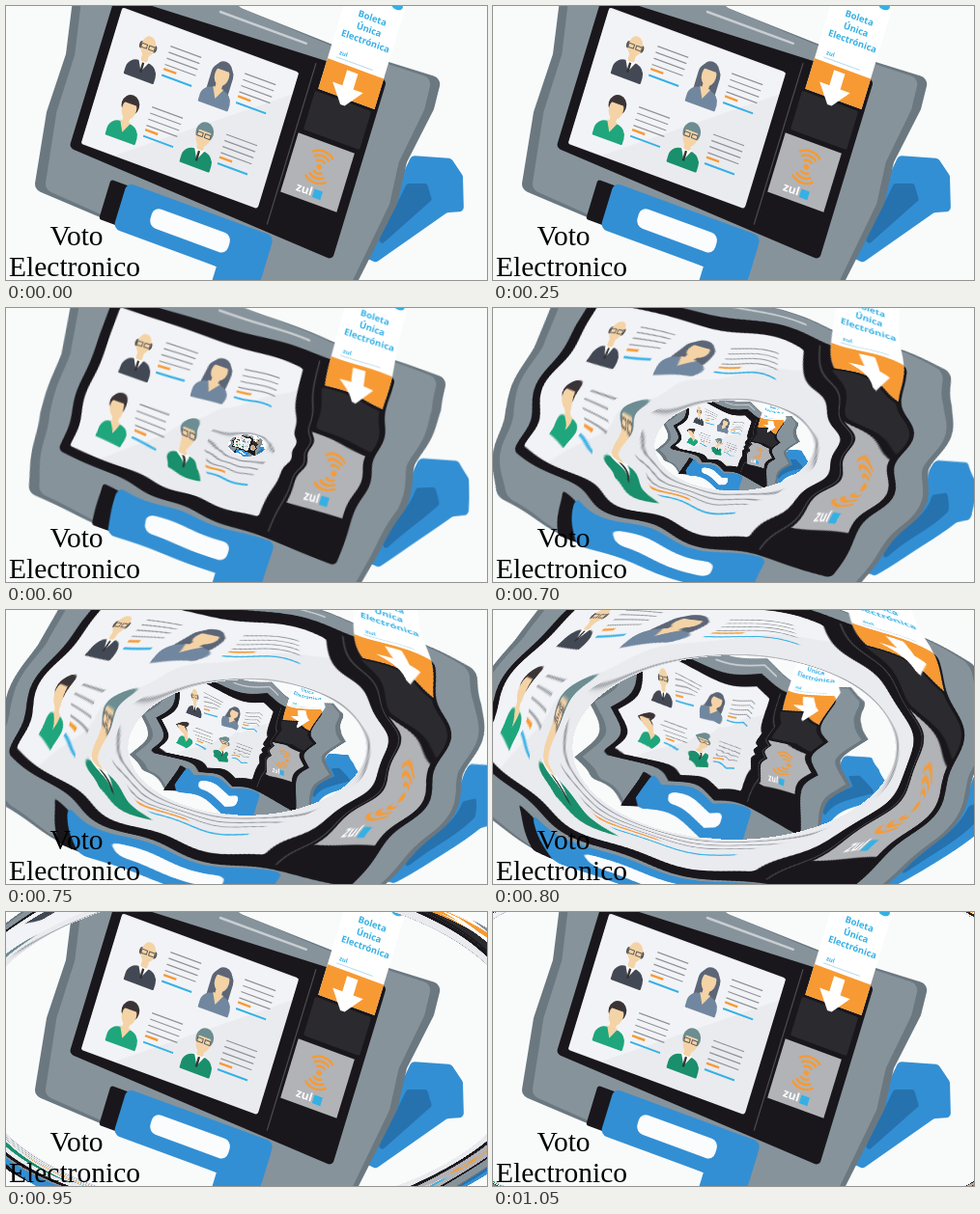
Recreate the animation shown at these times as an HTML page with a canvas. Size 498x284 px, loop 1100 ms.

```html
<!DOCTYPE html>
<html lang="es">
<head>
<meta charset="utf-8">
<title>Voto Electronico</title>
<style>
html, body { margin: 0; width: 100%; height: 100%; overflow: hidden; background: #f9fbfb; }
canvas { display: block; }
</style>
</head>
<body>
<canvas id="stage" width="498" height="284"></canvas>
<script>
const W = 498, H = 284, LOOP = 1100, STEP = 50, START = 600;
const LIGHT = '#87939b', DARK = '#6b7880', BLACK = '#19171b', WHITE = '#fbfcfd';
const BLUE = '#338fd3', DEEP = '#2672ae', CYAN = '#35b0e5', ORANGE = '#f79a33', SKIN = '#f4d3a6';

const stage = document.getElementById('stage').getContext('2d');
const scene = document.createElement('canvas');
scene.width = W;
scene.height = H;
const g = scene.getContext('2d', { willReadFrequently: true });

// Closed polygon with rounded corners
function poly(color, radius, ...points) {
  const mid = (a, b) => [(a[0] + b[0]) / 2, (a[1] + b[1]) / 2];
  g.beginPath();
  g.moveTo(...mid(points.at(-1), points[0]));
  points.forEach((p, i) =>
    g.arcTo(...p, ...mid(p, points[(i + 1) % points.length]), radius));
  g.closePath();
  g.fillStyle = color;
  g.fill();
}

function box(color, x, y, w, h, radius = 0) {
  g.fillStyle = color;
  g.beginPath();
  g.roundRect(x, y, w, h, radius);
  g.fill();
}

function oval(color, x, y, rx, ry, from = 0, to = 2 * Math.PI) {
  g.fillStyle = color;
  g.beginPath();
  g.ellipse(x, y, rx, ry, 0, from, to);
  g.fill();
}

function label(text, x, y, size, color) {
  g.font = `bold ${size}px "Open Sans", sans-serif`;
  g.fillStyle = color;
  g.textAlign = 'center';
  g.fillText(text, x, y);
}

function at(x, y, scale, draw) {
  g.save();
  g.translate(x, y);
  g.scale(scale, scale);
  draw();
  g.restore();
}

function person({ hair, coat, long, bald, tie, glasses }) {
  if (long) box(hair, -10, -10, 20, 31, [10, 10, 4, 4]);
  box(coat, -14, 13, 28, 16, [10, 10, 1, 1]);
  poly(tie ? '#fff' : SKIN, 0, [-5, 12], [5, 12], [0, 22]);
  if (tie) box('#333', -1, 14, 2, 9);
  box(SKIN, -3, 4, 6, 9, 1);
  if (bald) box(hair, -8, -4, 16, 7, 3);
  else oval(hair, 0, -3, 8, 9);
  oval(SKIN, 0, bald ? -1 : 1, 6.5, 9);
  if (!bald) oval(hair, 0, -4, 7.5, 6, Math.PI, 2 * Math.PI);
  if (glasses) {
    g.strokeStyle = '#56585b';
    g.lineWidth = 0.8;
    for (const x of [-6, 1]) g.strokeRect(x, -2, 5, 3.5);
  }
}

function record(x, y) {
  for (let i = 0; i < 4; i++) box('#8e9297', x, y + i * 6.6, 34, 1.2);
  box(ORANGE, x, y + 24, 14, 2.4);
  box(CYAN, x, y + 31, 33, 2);
}

const people = [
  { hair: '#55504d', coat: '#434954', bald: true, tie: true, glasses: true },
  { hair: '#5c6677', coat: '#71879f', long: true },
  { hair: '#3b3436', coat: '#1fa67c' },
  { hair: '#6c8d92', coat: '#198f6b', tie: true, glasses: true },
];

function drawScreen() {
  box('#eaebef', -97.5, -74, 195, 148, 3);
  poly('#f2f3f6', 0, [-97, -73], [97, -73], [97, -50], [-60, 73], [-97, 73]);
  people.forEach((look, i) => {
    const x = -60 + 82 * (i % 2), y = -44 + 66 * Math.floor(i / 2);
    at(x, y, 1.18, () => person(look));
    record(x + 22, y - 10);
  });
}

function drawTicket() {
  box('#fff', 121.5, -190, 62, 125);
  oval(CYAN, 175, -174, 6, 4);
  ['Boleta', 'Única', 'Electrónica'].forEach((word, i) =>
    label(word, 154, -150 + 12.5 * i, 9.5, CYAN));
  label('zul', 136, -106, 6, CYAN);
  box('#b9dcec', 130, -103, 40, 1);
  box(ORANGE, 121.5, -98, 62, 33);
  at(150.5, -78, 1.2, () => {
    box('#fff', -5, -13, 10, 16);
    poly('#fff', 0, [-14, 1], [14, 1], [2, 17], [-2, 17]);
  });
}

function drawCard() {
  box('#b1b3b7', 115, -15, 62, 64);
  at(146, 11, 1, () => {
    oval(ORANGE, 0, 0, 3, 2.5);
    g.strokeStyle = ORANGE;
    g.lineWidth = 2.4;
    for (const middle of [-Math.PI / 2, Math.PI / 2]) {
      for (let r = 7; r < 20; r += 5) {
        g.beginPath();
        g.arc(0, 0, r, middle - 0.75, middle + 0.75);
        g.stroke();
      }
    }
  });
  label('zul', 138, 42, 12, '#fff');
  box(CYAN, 148, 34, 9, 9);
}

function caseShape(color) {
  poly(color, 9, [72, -30], [200, -30], [243, 2], [338, 40], [451, 75], [443, 107], [415, 162],
    [405, 205], [362, 290], [265, 290], [29, 190], [42, 110], [62, 50]);
}

function drawScene() {
  g.fillStyle = '#f9fbfb';
  g.fillRect(0, 0, W, H);

  // Rear foot
  poly(BLUE, 5, [420, 155], [461, 158], [473, 176], [474, 213], [457, 214], [383, 266], [370, 260]);
  poly(DEEP, 3, [415, 184], [436, 184], [441, 201], [380, 255]);

  // Case, its lit face narrower than its sides
  caseShape(DARK);
  g.save();
  g.translate(W / 2, 0);
  g.scale(0.95, 1);
  g.translate(-W / 2, 0);
  caseShape(LIGHT);
  g.restore();

  // Everything on the front lies in one tilted plane centred on the screen
  g.setTransform(0.938, 0.346, -0.29, 0.956, 190.5, 105.75);
  box('#c9ced2', 0, -106, 97, 2.5, 1);
  poly(BLACK, 5, [-108, -84], [187, -98], [187, 97], [-108, 82]);
  drawScreen();
  box('#4b4b50', 111, -89, 1.2, 175);
  box('#2b2a2e', 119, -62, 62, 42, 2);
  drawTicket();
  drawCard();

  // Front handle
  box(BLACK, -57, 98, 24, 43, 3);
  box(BLUE, -40, 95, 162, 50, 7);
  box(BLUE, 74, 100, 48, 75, 7);
  box(WHITE, -6, 109, 86, 21, 8);
  g.resetTransform();
}

function caption() {
  stage.font = '29.5px "Liberation Serif", serif';
  stage.fillStyle = '#000';
  stage.textAlign = 'center';
  stage.fillText('Voto', 73, 248);
  stage.fillText('Electronico', 71, 280);
}

drawScene();
const still = g.getImageData(0, 0, W, H);
const frame = stage.createImageData(W, H);

const clamp = (v, lo, hi) => Math.max(lo, Math.min(hi, v));

// Bilinear copy of the scene at (x, y) into pixel i
function sample(x, y, i) {
  x = clamp(x, 0, W - 1.001);
  y = clamp(y, 0, H - 1.001);
  const x0 = Math.floor(x), y0 = Math.floor(y), fx = x - x0, fy = y - y0;
  const d = still.data, p = (y0 * W + x0) * 4, q = p + W * 4;
  for (let c = 0; c < 3; c++) {
    const top = d[p + c] * (1 - fx) + d[p + 4 + c] * fx;
    const bottom = d[q + c] * (1 - fx) + d[q + 4 + c] * fx;
    frame.data[i + c] = top * (1 - fy) + bottom * fy;
  }
  frame.data[i + 3] = 255;
}

// A growing oval holds the next picture and pushes the old one outwards
function warp(time) {
  const p = clamp((time - 515) / 590, 0, 1);
  const hole = Math.SQRT2 * p * p * (3 - 2 * p);
  const stretch = 1 - hole / 1.44;
  const ripple = 0.14 * Math.min(1, hole * 4);
  for (let y = 0, i = 0; y < H; y++) {
    for (let x = 0; x < W; x++, i += 4) {
      const u = (x - W / 2) / (W / 2), v = (y - H / 2) / (H / 2);
      const r = Math.hypot(u, v) || 1e-6;
      const phase = 5 * (Math.atan2(-v, u) - 0.733);
      let k;
      if (r < hole) {
        const star = 1 - 2 * Math.abs(Math.sin(phase));
        k = 1 / Math.min(1, hole * (1.07 + 0.075 * star));
      } else {
        const from = (r - hole) / stretch;
        k = from * (1 - ripple * Math.cos(2 * phase) * Math.max(0, 1 - from)) / r;
      }
      sample(W / 2 * (1 + u * k), H / 2 * (1 + v * k), i);
    }
  }
  stage.putImageData(frame, 0, 0);
}

let shown = -1;
function tick() {
  const time = Math.floor(performance.now() % LOOP / STEP) * STEP;
  if (time !== shown) {
    shown = time;
    if (time < START) stage.putImageData(still, 0, 0);
    else warp(time);
    caption();
  }
  requestAnimationFrame(tick);
}
tick();
</script>
</body>
</html>
```
